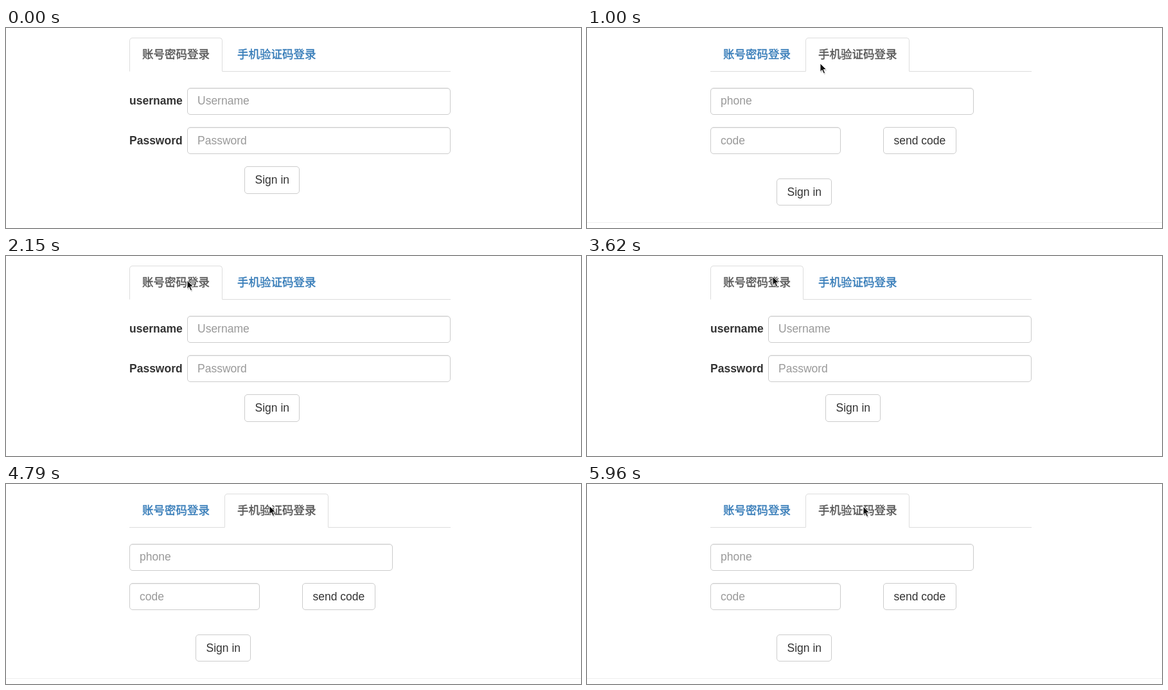
An HTML page that plays this animation: 895x311 px, repeating every 6040 ms.

```html
<!DOCTYPE html>
<html lang="zh-CN">
<head>
<meta charset="utf-8">
<title>Login tabs</title>
<style>
html, body { margin: 0; width: 100%; height: 100%; overflow: hidden; background: #fff; }
#stage {
  position: relative; width: 895px; height: 311px; overflow: hidden;
  font: 17.5px "Liberation Sans", Arial, sans-serif; color: #333; cursor: default;
}
#stage * { box-sizing: border-box; }
#stage div, #stage svg { position: absolute; white-space: nowrap; }
.rule { left: 192px; top: 67px; width: 500px; height: 1px; background: #ddd; }
.tab {
  top: 15px; height: 53px; padding-left: 19px; line-height: 47px;
  border: 1px solid transparent; border-radius: 5px 5px 0 0; color: #337ab7;
  font-family: "Noto Sans CJK SC", "Noto Sans CJK", sans-serif;
  -webkit-text-stroke: .4px currentColor;
}
.tab.hover { background: #eee; border-color: #eee #eee #ddd; color: #23527c; }
.tab.active { background: #fff; border-color: #ddd #ddd #fff; color: #555; }
.pane { inset: 0; visibility: hidden; }
.pane.active { visibility: visible; }
.label { left: 192px; font-weight: bold; line-height: 42px; }
.input, .button {
  height: 42px; padding-left: 15px; line-height: 40px;
  border: 1px solid #ccc; border-radius: 5px;
}
.input { color: #999; box-shadow: inset 0 1px 1px rgba(0, 0, 0, .075); }
.button { padding-left: 15.5px; }
.tall { height: 43px; line-height: 41px; }
.row1 { top: 93px; }
.row2 { top: 154px; }
.label.row1 { line-height: 40px; }
.input.row1 { line-height: 38px; }
.hr { left: 0; top: 302px; width: 100%; height: 1px; background: #eee; }
#pointer { left: 0; top: 0; overflow: visible; visibility: hidden; }
#pointer .beam, #pointer.text .arrow { display: none; }
#pointer.text .beam { display: inline; }
</style>
</head>
<body>
<div id="stage">
  <div class="rule"></div>
  <div class="tab" style="left:192px;width:145px">账号密码登录</div>
  <div class="tab" style="left:340px;width:162px">手机验证码登录</div>

  <div class="pane">
    <div class="label row1">username</div>
    <div class="input row1" style="left:282px;width:410px">Username</div>
    <div class="label row2">Password</div>
    <div class="input row2" style="left:282px;width:410px">Password</div>
    <div class="button tall" style="left:371px;top:215px;width:86px">Sign in</div>
  </div>

  <div class="pane">
    <div class="input row1" style="left:192px;width:410px">phone</div>
    <div class="input row2" style="left:192px;width:203px">code</div>
    <div class="button row2" style="left:461px;width:114px">send code</div>
    <div class="button" style="left:295px;top:234px;width:86px">Sign in</div>
    <div class="hr"></div>
  </div>

  <svg id="pointer" width="14" height="20">
    <g class="arrow">
      <path d="M1 2V15L4 12.2 6.2 17.5 8.4 16.6 6.2 11.5H10.5Z" fill="#000" opacity=".18"/>
      <path d="M0 0V13.2L3 10.4 5.3 15.8 7.6 14.8 5.3 9.6H9.6Z" fill="#111" stroke="#fff" stroke-width=".9"/>
    </g>
    <path class="beam" d="M-2 -7H2M0 -7V8M-2 8H2" fill="none" stroke="#23527c"/>
  </svg>
</div>
<script>
const LOOP = 6040, STEP = 77.2, LEAD = 12;

// Where the pointer has arrived by a given step; a click lands one step later
const stops = [
  { at: 1, x: 757, y: 292 },
  { at: 8, x: 398, y: 64, click: true },
  { at: 17, x: 309, y: 41, click: true },
  { at: 28, x: 282, y: 38 },
  { at: 39, x: 277, y: 45 },
  { at: 47, x: 289, y: 32 },
  { at: 60, x: 416, y: 34, click: true },
  { at: 68, x: 302, y: 41, click: true },
  { at: 74, x: 426, y: 35, click: true },
  { at: 77, x: 430, y: 35 }
];

const tabs = [...document.querySelectorAll('.tab')];
const panes = [...document.querySelectorAll('.pane')];
const pointer = document.getElementById('pointer');
const smooth = k => k * k * (3 - 2 * k);

// The pointer rests, then leaves just in time; short hops are quicker than long ones
function pointerAt(step) {
  const i = stops.findIndex(stop => stop.at >= step);
  const to = stops.at(i), from = i > 0 ? stops[i - 1] : to;
  const dx = to.x - from.x, dy = to.y - from.y;
  const duration = Math.max(1, Math.min(7, to.at - from.at, Math.hypot(dx, dy) / 12));
  const k = smooth(Math.min(1, Math.max(0, 1 - (to.at - step) / duration)));
  return [Math.round(from.x + dx * k), Math.round(from.y + dy * k)];
}

function render(step) {
  const [x, y] = pointerAt(step);
  const current = stops.filter(stop => stop.click && stop.at < step).length % 2;
  const over = (el, padX, padY) =>
    Math.abs(x - el.offsetLeft - el.offsetWidth / 2) < el.offsetWidth / 2 - padX &&
    Math.abs(y - el.offsetTop - el.offsetHeight / 2) < el.offsetHeight / 2 - padY;

  tabs.forEach((tab, i) => {
    tab.classList.toggle('active', i === current);
    tab.classList.toggle('hover', i !== current && over(tab, 0, 0));
    panes[i].classList.toggle('active', i === current);
  });
  pointer.classList.toggle('text', over(tabs[1 - current], 20, 18));
  pointer.style.transform = `translate(${x}px, ${y}px)`;
  pointer.style.visibility = step > 0 ? 'visible' : 'hidden';
}

let start, shown;
function frame(now) {
  start ??= now;
  const step = Math.floor(((now - start) % LOOP + LEAD) / STEP);
  if (step !== shown) render(shown = step);
  requestAnimationFrame(frame);
}
render(0);
requestAnimationFrame(frame);
</script>
</body>
</html>
```
